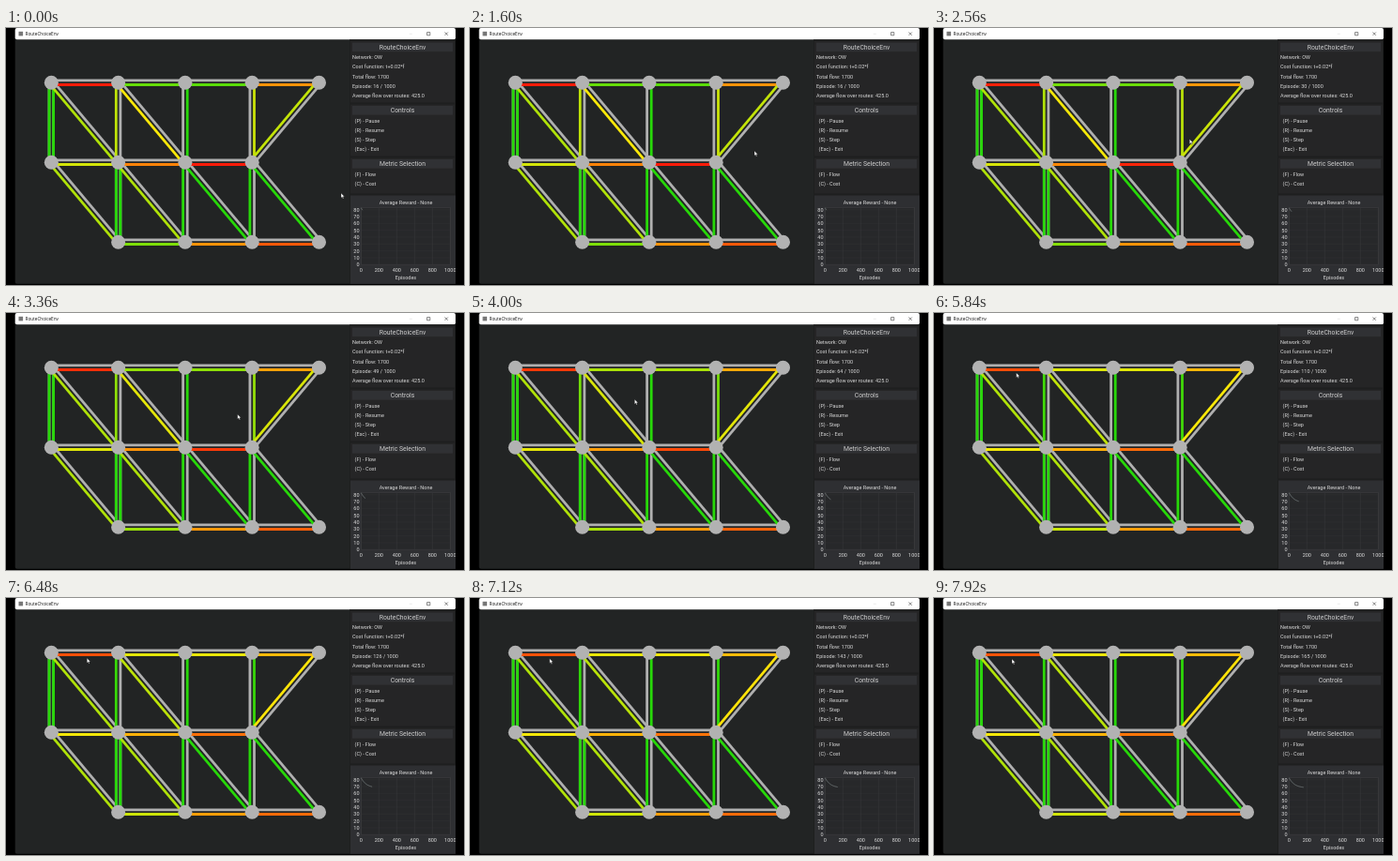
An HTML page for the animation above (8 s loop, 488 by 274 pixels).

```html
<!DOCTYPE html>
<html lang="en">
<head>
<meta charset="utf-8">
<title>RouteChoiceEnv</title>
<style>
html, body { margin: 0; width: 100%; height: 100%; overflow: hidden; background: #000; }
svg { display: block; width: 100vw; height: 100vh; }
text { font: 5.5px Roboto, sans-serif; fill: #dcdcdc; white-space: pre; }
.head { font-size: 6.8px; fill: #cfcfcf; }
.title { font: 4.7px "Open Sans", sans-serif; fill: #111; }
</style>
</head>
<body>
<svg id="stage" viewBox="0 0 488 274"></svg>
<script>
const LOOP = 8000, STEP = 80;
const stage = document.getElementById('stage');

function add(tag, attrs, text) {
  const el = document.createElementNS('http://www.w3.org/2000/svg', tag);
  for (const k in attrs) el.setAttribute(k, attrs[k]);
  if (text !== undefined) el.textContent = text;
  return stage.appendChild(el);
}
const rect = (x, y, width, height, fill, more) => add('rect', { x, y, width, height, fill, ...more });
const path = (d, stroke, width, more) => add('path', { d, stroke, 'stroke-width': width, fill: 'none', ...more });
// y is the vertical middle of the capitals
const label = (s, x, y, anchor = 'start', cls = '') =>
  add('text', { x, y: y + 2, 'text-anchor': anchor, class: cls }, s);
const mix = (a, b, k) => a + (b - a) * k;

// Load colour: 120 is free (green), 60 yellow, 0 full (red)
function loadColour(hue) {
  const r = Math.min(255, mix(250, 15, (hue - 60) / 60));
  const g = hue < 60 ? 232 * hue / 60 : mix(232, 214, (hue - 60) / 60);
  return `rgb(${Math.round(r)},${Math.round(g)},8)`;
}

// Window
rect(9.7, 0, 469.3, 272.7, '#222424', { rx: 2 });
rect(9.7, 0, 469.3, 12.3, '#fff', { rx: 2 });
rect(13.5, 3.8, 4.6, 4.6, '#777');
label('RouteChoiceEnv', 20.5, 6, 'start', 'title');
path('M429.8 6.3h3', '#ccc', .4);
path('M448.6 4.6h3.2v3.2h-3.2zM467.6 4.5l3.3 3.3m0-3.3l-3.3 3.3', '#333', .6);

// Network: three rows, numbered from the top left
const nodes = [];
[[0, 5], [0, 4], [1, 5]].forEach(([from, to], row) => {
  for (let i = from; i < to; i++) nodes.push([48.3 + 71.3 * i, 58.2 + 85 * row]);
});

const roads = [];
const road = (a, b, from, to = from) => roads.push({ a, b, from, to });
const roadsAt = (hue, ...pairs) => pairs.forEach(([a, b]) => road(a, b, hue));

// Horizontal
road(0, 1, 7, 22);
road(1, 2, 98, 63);
road(2, 3, 101, 61);
road(3, 4, 38, 49);
road(5, 6, 70, 61);
road(6, 7, 34, 47);
road(7, 8, 7, 31);
road(9, 10, 92, 70);
road(10, 11, 38, 41);
road(11, 12, 23, 28);
// Vertical
roadsAt(114, [0, 5], [5, 0], [7, 2], [6, 9], [9, 6], [7, 10], [8, 11]);
road(1, 6, 75, 113);
road(8, 3, 72, 113);
// Diagonal
roadsAt(79, [0, 6], [5, 9], [6, 10]);
roadsAt(114, [7, 11], [8, 12]);
road(1, 7, 60, 77);
road(4, 8, 74, 58);

// Each direction keeps to its own side of the middle line
function lane(a, b, stroke) {
  const [x1, y1] = nodes[a], [x2, y2] = nodes[b];
  const k = 2.3 / Math.hypot(x2 - x1, y2 - y1);
  const ox = (y1 - y2) * k, oy = (x2 - x1) * k;
  return path(`M${x1 + ox} ${y1 + oy}L${x2 + ox} ${y2 + oy}`, stroke, 2.8);
}
roads.forEach(({ a, b }) => lane(b, a, '#b0b0b0'));
roads.forEach(r => r.el = lane(r.a, r.b, loadColour(r.from)));
nodes.forEach(([cx, cy]) => add('circle', { cx, cy, r: 7.5, fill: '#b2b2b2' }));

// Side panel
rect(366, 12.3, 113, 260.4, '#1e1f1f');
[[14, 65.5], [81.5, 55], [138.5, 38]].forEach(([y, h]) => rect(367, y, 111, h, '#252526'));
rect(367, 178.5, 112, 94.2, '#2e2f32');
['RouteChoiceEnv', 'Controls', 'Metric Selection'].forEach((s, i) => {
  const y = [20.4, 87.8, 144.8][i];
  rect(369, y - 4.8, 107, 9.6, '#303134');
  label(s, 422.5, y + .4, 'middle', 'head');
});
const list = (x, y, lines) => lines.map((s, i) => label(s, x, y + 10.3 * i));
const [, , , episodeText] = list(369, 31, ['Network: OW', 'Cost function: t+0.02*f', 'Total flow: 1700', '',
  'Average flow over routes: 425.0']);
list(371.5, 98.5, ['(P) - Pause', '(R) - Resume', '(S) - Step', '(Esc) - Exit']);
list(371.5, 155.6, ['(F) - Flow', '(C) - Cost']);

// Reward plot
const px = e => 378.3 + e * .095;
const py = v => 252.2 - v * .73;
label('Average Reward - None', 426, 186, 'middle');
rect(378.3, 191.5, 95, 60.7, '#27282a', { stroke: '#404143', 'stroke-width': .5 });
for (let v = 0; v <= 80; v += 10) {
  path(`M378.3 ${py(v)}h95`, '#333436', .4);
  label(v, 376.5, py(v), 'end');
}
for (let e = 0; e <= 1000; e += 200) {
  path(`M${px(e)} 191.5v60.7`, '#3a3b3d', .5);
  label(e, px(e), 257.6, 'middle');
}
label('Episodes', 426, 266, 'middle');
const curve = path('', '#787f81', .8);
rect(479, 0, 9, 274, '#000');

const cursor = path('M0 0v5.2l1.2-1.1 .8 1.8 .9-.4-.8-1.7h1.6z', '#111', .35, { fill: '#fff' });
// time, x, y
const trail = [[0, 357, 176], [1600, 303, 131], [3360, 246.7, 108], [4640, 104, 76], [5840, 87.7, 63.7], [7920, 83, 65]];
function cursorAt(t) {
  const i = Math.max(1, trail.findIndex(p => p[0] >= t));
  const [t0, x0, y0] = trail[i - 1], [t1, x1, y1] = trail[i];
  const k = (t - t0) / (t1 - t0);
  return [mix(x0, x1, k), mix(y0, y1, k)];
}

// Paused at 16, then counting slightly faster and faster
function episodeAt(t) {
  const s = (t - 3360) / 1000;
  return Math.max(16, Math.floor(49.5 + 23.7 * s + .3625 * s * s));
}

function draw(now) {
  const t = Math.floor(now % LOOP / STEP) * STEP;
  const episode = episodeAt(t);
  episodeText.textContent = `Episode: ${episode} / 1000`;

  const settled = 1 - Math.exp(-(((episode - 16) / 60) ** 1.5));
  roads.forEach(r => r.el.setAttribute('stroke', loadColour(mix(r.from, r.to, settled))));

  const points = [];
  for (let e = 1; e <= episode; e += 3) points.push(`${px(e)} ${py(68 + 15 * Math.exp(-e / 60))}`);
  curve.setAttribute('d', 'M' + points.join('L'));

  cursor.setAttribute('transform', `translate(${cursorAt(t)})`);
}

let start;
function tick(now) {
  start ??= now;
  draw(now - start);
  requestAnimationFrame(tick);
}
draw(0);
requestAnimationFrame(tick);
</script>
</body>
</html>
```
